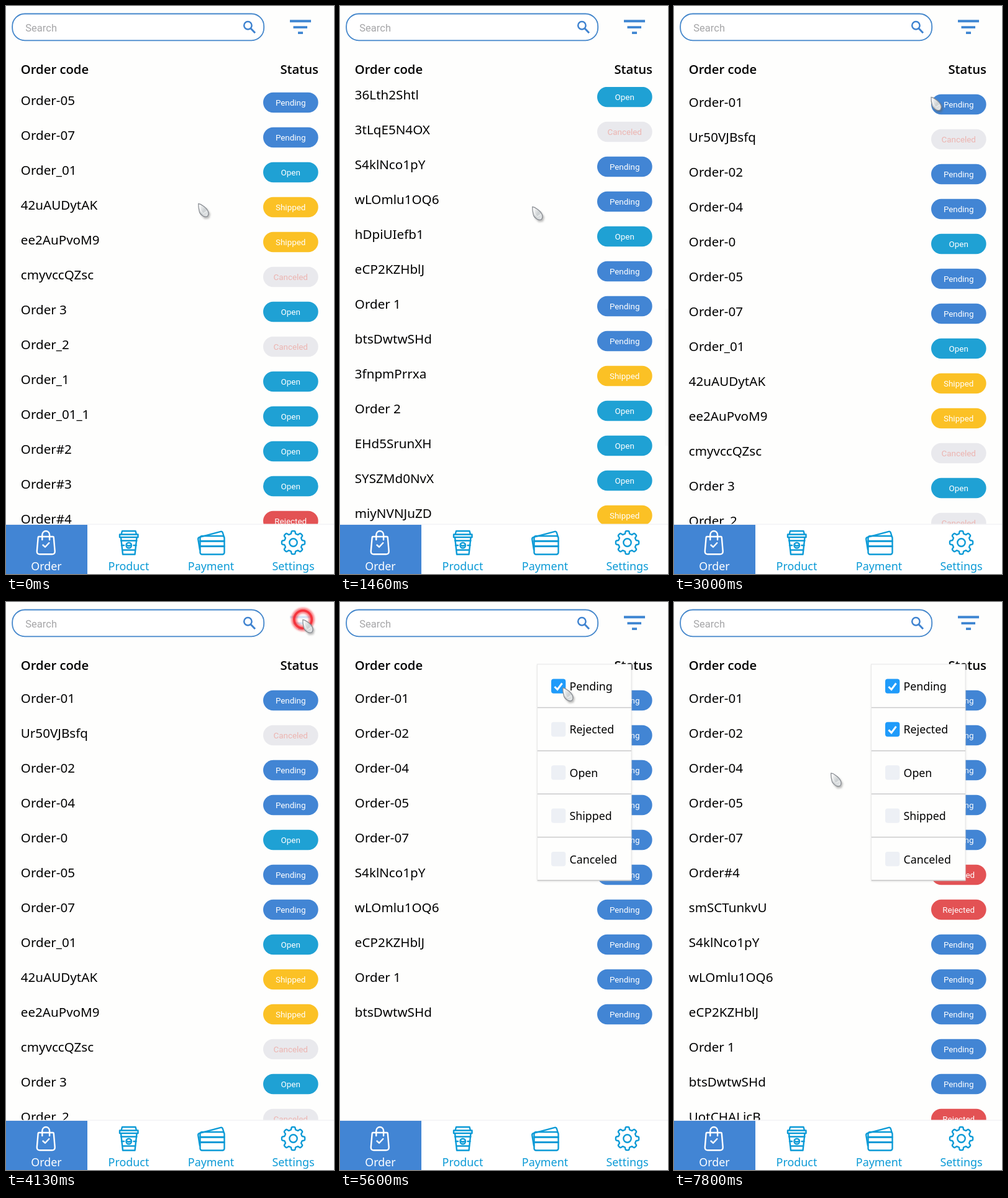
Recreate the animation shown at these times as an HTML page. Size 528x912 px, loop 8 s.

```html
<!DOCTYPE html>
<html lang="en">
<head>
<meta charset="utf-8">
<title>Order list</title>
<style>
  html, body { margin: 0; width: 100%; height: 100%; overflow: hidden; background: #fefefd; }
  svg { display: block; }
  text { font-family: "Noto Sans", "Open Sans", sans-serif; }
  .head { font: 600 20.3px "Open Sans", "Noto Sans", sans-serif; }
  .code { font-size: 20.6px; }
  .pill { font: 13.4px Roboto, sans-serif; text-anchor: middle; }
  .tab { font-size: 17.9px; text-anchor: middle; }
  .option { font-size: 17.8px; }
  .search { font: 16.5px Roboto, sans-serif; fill: #a6a6a8; }
  .line { fill: none; stroke-width: 2.4; stroke-linejoin: round; stroke-linecap: round; }
</style>
</head>
<body>
<svg width="528" height="912" viewBox="0 0 528 912">
  <defs>
    <clipPath id="listArea"><rect x="0" y="130" width="528" height="703"/></clipPath>
    <linearGradient id="metal" x1="0" y1="0" x2="1" y2="1">
      <stop offset=".1" stop-color="#fafafa"/>
      <stop offset=".55" stop-color="#cdd1d3"/>
      <stop offset="1" stop-color="#eef0f1"/>
    </linearGradient>
    <filter id="soft" x="-50%" y="-50%" width="200%" height="200%"><feGaussianBlur stdDeviation="1.6"/></filter>
  </defs>

  <rect x="10.2" y="12.500" width="405" height="42.800" rx="20" fill="#fff" stroke="#4386cb" stroke-width="1.8"/>
  <text class="search" x="31.3" y="40.5">Search</text>
  <g fill="none" stroke="#3f83d0" stroke-width="2.5">
    <circle cx="389.4" cy="31.2" r="6.2"/>
    <path d="M394 36l7 7.2" stroke-width="3"/>
  </g>
  <path id="filter" fill="#3f86d2" d="M457 22.3h34v3.9h-34zM462.5 32.2h22.5v3.9h-22.5zM470 41.2h8v3.9h-8z"/>
  <text class="head" x="23.8" y="108.7">Order code</text>
  <text class="head" x="503" y="108.7" text-anchor="end">Status</text>

  <g clip-path="url(#listArea)"><g id="lists"></g></g>
  <rect id="bar" x="523" width="5" height="220" fill="#b9b9bc"/>
  <circle id="spin" cx="265" cy="482" r="11" pathLength="360" fill="none" stroke="#0b938c" stroke-width="2.6"/>

  <rect y="831.5" width="528" height="2" fill="#f3f3f6"/>
  <rect y="833" width="528" height="79" fill="#fff"/>
  <rect y="833" width="131" height="79" fill="#4285d4"/>
  <g class="line" stroke="#fff">
    <path d="M53 852h22.5q1.200 0 1.300 1.300l1.900 22q.3 5-4.700 5H54.500q-5 0-4.700-5l1.900-22q.1-1.300 1.300-1.300z"/>
    <path d="M58.300 857v-8a5.900 6 0 0 1 11.800 0v8M59.500 865.500l3.500 3.200 6.300-6.700"/>
  </g>
  <g class="line" stroke="#0b9ad6" stroke-width="2">
    <path d="M185.500 848.500l1.500-5.500h21.500l1.500 5.500M183 848.500h29.500v4.500h-29.500zM185 853.500l3 27h19.500l3-27M185 858.500h25.500M187 873.500h21.500"/>
    <circle cx="197.700" cy="866" r="4.300"/>
    <path d="M195.500 866q2.200 2 4.400 0M186 866h4M205.500 866h4"/>
  </g>
  <g class="line" stroke="#0b9ad6">
    <rect x="312.500" y="851" width="39" height="29.500" rx="3"/>
    <path d="M312 873l-2.700-16.500q-.5-3 2.300-3.700l34-9q2.500-.6 3.200 1.700l1.700 5.500"/>
    <path d="M313 859.200h38M313 867.500h38" stroke-width="3.100"/>
  </g>
  <g class="line" stroke="#0b9ad6">
    <path id="gear"/>
    <circle cx="462.500" cy="861.500" r="6.200"/>
  </g>
  <g fill="#0b9ad6">
    <text class="tab" x="65" y="905.500" fill="#fff">Order</text>
    <text class="tab" x="197.500" y="905.500">Product</text>
    <text class="tab" x="330" y="905.500">Payment</text>
    <text class="tab" x="462.500" y="905.500">Settings</text>
  </g>

  <g id="menu">
    <rect x="317.500" y="101" width="152" height="347.500" fill="#999" opacity=".3" filter="url(#soft)"/>
    <rect x="317.500" y="100" width="151.500" height="347" fill="#fefefd" stroke="#e8e8e8"/>
  </g>
  <g id="ring" fill="none" stroke="#f5222c">
    <circle stroke-width="9" opacity=".6" filter="url(#soft)"/>
    <circle stroke-width="3.600" opacity=".9"/>
  </g>
  <g id="cursor">
    <path d="M3 4L15 10 20 18 18 25 11 26 5 20z" fill="#555" opacity=".4" filter="url(#soft)"/>
    <path d="M.8 1.300Q4 1.500 8 4.800 14 8.500 16.700 14.500 17.800 18.500 15.500 21.500 12.500 23.400 8.500 21.300 3.500 18.500 2.200 14 .4 7 .8 1.300z" fill="url(#metal)" stroke="#85898f" stroke-width="1.200"/>
    <path d="M3 5Q3.500 13 8.500 17.500L14.500 13.500" fill="none" stroke="#fff" stroke-width="1" opacity=".8"/>
  </g>
</svg>
<script>
const LOOP = 8000, ROW = 56, NOTCH = 94.33;
const $ = id => document.getElementById(id);
const add = (parent, tag, attrs, label) => {
  const el = document.createElementNS('http://www.w3.org/2000/svg', tag);
  for (const k in attrs) el.setAttribute(k, attrs[k]);
  if (label) el.textContent = label;
  return parent.appendChild(el);
};
const show = (el, on) => el.setAttribute('visibility', on ? 'visible' : 'hidden');
const ramp = (t, a, b) => Math.min(1, Math.max(0, (t - a) / (b - a)));

// First letter is the status, the rest is the order code
const status = {
  P: ['Pending', '#4285d4', '#fff'],
  O: ['Open', '#1fa1d4', '#fff'],
  S: ['Shipped', '#fbc125', '#fff'],
  C: ['Canceled', '#e9e9ed', '#ecb4b0'],
  R: ['Rejected', '#e35254', '#fff']
};
const orders = ('POrder-01,CUr50VJBsfq,POrder-02,POrder-04,OOrder-0,POrder-05,POrder-07,OOrder_01,' +
  'S42uAUDytAK,See2AuPvoM9,CcmyvccQZsc,OOrder 3,COrder_2,OOrder_1,OOrder_01_1,OOrder#2,OOrder#3,' +
  'ROrder#4,OOrder#5,RsmSCTunkvU,O36Lth2Shtl,C3tLqE5N4OX,PS4klNco1pY,PwLOmlu1OQ6,OhDpiUIefb1,' +
  'PeCP2KZHblJ,POrder 1,PbtsDwtwSHd,S3fnpmPrrxa,OOrder 2,OEHd5SrunXH,OSYSZMd0NvX,SmiyNVNJuZD,' +
  'RUotCHALicB').split(',');

function makeList(kinds) {
  const g = add($('lists'), 'g', {});
  orders.filter(o => kinds.includes(o[0])).forEach((o, i) => {
    const [label, fill, ink] = status[o[0]], y = i * ROW;
    add(g, 'text', { class: 'code', x: 23.8, y: y + 162.2 }, o.slice(1));
    add(g, 'rect', { x: 414, y: y + 141.8, width: 88.6, height: 32.5, rx: 16.2, fill });
    add(g, 'text', { class: 'pill', x: 458.2, y: y + 163, fill: ink }, label);
  });
  return g;
}
const all = makeList('POSCR'), pending = makeList('P'), both = makeList('PR');

const ticks = [...'PROSC'].map((k, i) => {
  const y = 135.5 + i * 69.35, menu = $('menu');
  add(menu, 'rect', { x: 318, y: y + 33.3, width: 151, height: 1.5, fill: '#cacacb' });
  add(menu, 'rect', { x: 340, y: y - 12, width: 23.3, height: 23.3, rx: 4, fill: '#edf0f5' });
  add(menu, 'text', { class: 'option', x: 369.5, y: y + 6.6 }, status[k][0]);
  const tick = add(menu, 'g', {});
  add(tick, 'rect', { x: 340, y: y - 12, width: 23.3, height: 23.3, rx: 4, fill: '#1f9bfa' });
  add(tick, 'path', { d: `M345.5 ${y + .5}l4.5 4.5 7.5-10`, fill: 'none', stroke: '#fff', 'stroke-width': 3 });
  return tick;
});

// Eight rounded teeth
let gear = '';
for (let i = 0; i < 160; i++) {
  const a = i / 80 * Math.PI, w = Math.tanh(3 * Math.cos(8 * a));
  const r = 16.5 + 2.1 * w;
  gear += (i ? 'L' : 'M') + (462.5 + r * Math.sin(a)).toFixed(2) + ' ' + (861.5 - r * Math.cos(a)).toFixed(2);
}
$('gear').setAttribute('d', gear + 'z');

const wheel = [[0, 3], [130, 6], [660, 8], [730, 9], [800, 10], [860, 11], [930, 12],
  [1600, 9], [1660, 5], [2060, 1], [2130, 0]];
const path = [[0, 309, 316], [1130, 309, 316], [1460, 309, 321], [2330, 309, 321], [3130, 421, 132],
  [3200, 421, 132], [3750, 486, 9], [4000, 477, 27], [4200, 477, 27], [4860, 358, 136.5],
  [6799, 358, 136.5], [6800, 357, 203], [7130, 357, 203], [7600, 260, 259], [7660, 260, 259],
  [7800, 252, 273.5], [LOOP, 252, 273.5]];
const clicks = [[4075, 478, 28], [4850, 357.3, 137.5], [6825, 356, 204]];
const loads = [[5050, 5600], [6850, 7400]];

function barAlpha(t) {
  if (t < 130) return 0;
  if (t < 200) return .5;
  if (t < 1600) return 1 - .94 * ramp(t, 1130, 1460);
  return 1 - ramp(t, 2330, 2660);
}

function draw(t) {
  const scroll = wheel.filter(w => w[0] <= t).pop()[1] * NOTCH;
  all.setAttribute('transform', `translate(0 ${-scroll})`);
  show(all, t < 5000);
  show(pending, t >= 5600 && t < 6850);
  show(both, t >= 7400);
  $('bar').setAttribute('y', 130 + scroll * .3145);
  $('bar').setAttribute('opacity', barAlpha(t));

  $('filter').setAttribute('opacity', t < 4060 ? 1 : .2 + .8 * ramp(t, 4200, 4400));
  $('menu').setAttribute('opacity', ramp(t, 4200, 4330));
  ticks.forEach((el, i) => show(el, t >= [4930, 6860][i]));

  const load = loads.find(l => t >= l[0] && t < l[1]);
  show($('spin'), load);
  if (load) {
    const d = t - load[0], sweep = Math.min(280, 8 + .66 * d);
    $('spin').setAttribute('stroke-dasharray', `${sweep} ${360 - sweep}`);
    $('spin').setAttribute('transform', `rotate(${.27 * d - 98} 265 482)`);
  }

  const click = clicks.find(c => t >= c[0] && t < c[0] + 360);
  show($('ring'), click);
  if (click) {
    const d = t - click[0];
    $('ring').setAttribute('transform', `translate(${click[1]} ${click[2]})`);
    $('ring').setAttribute('opacity', 1 - (d / 360) ** 1.6);
    for (const c of $('ring').children) c.setAttribute('r', 9 + .093 * d);
  }

  const n = path.findIndex(p => p[0] > t), [a, x, y] = path[n - 1], [b, x2, y2] = path[n];
  const p = ramp(t, a, b), e = p * p * (3 - 2 * p);
  $('cursor').setAttribute('transform', `translate(${x + (x2 - x) * e} ${y + (y2 - y) * e})`);
}

function frame() {
  draw(performance.now() % LOOP);
  requestAnimationFrame(frame);
}
frame();
</script>
</body>
</html>
```
